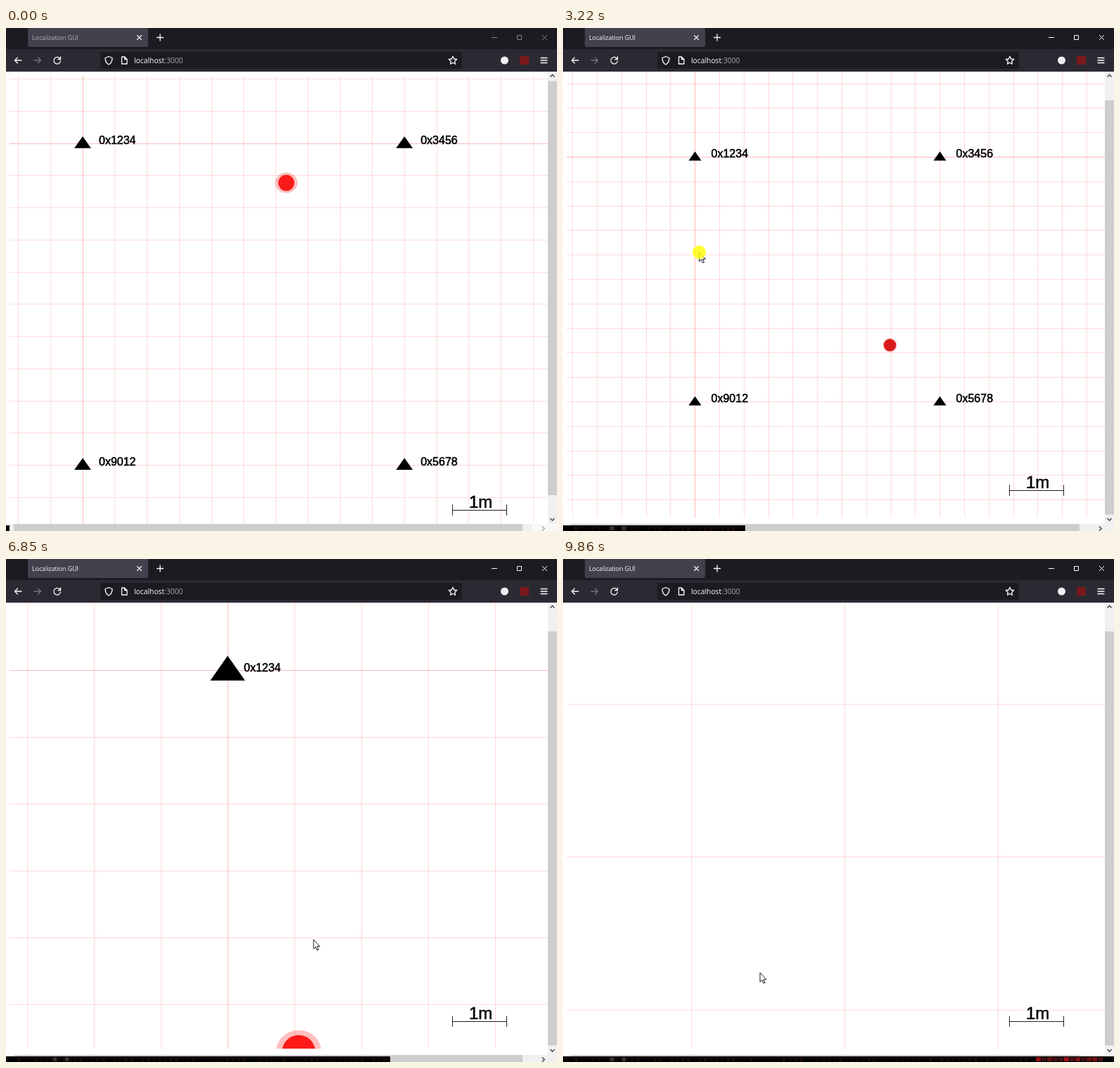
Animation, 783 px wide and 715 px high, one loop 9.93 s. Source, as an HTML page:

```html
<!DOCTYPE html>
<html lang="en">
<head>
<meta charset="utf-8">
<title>Localization GUI</title>
<style>
  html, body { margin: 0; width: 100%; height: 100%; overflow: hidden; background: #fff; }
  svg { display: block; }
  .ui { font-family: "Open Sans", "Noto Sans", sans-serif; }
  .label { font-family: "Liberation Sans", Arial, sans-serif; fill: #000; stroke: #000; stroke-width: .55; }
  .icon { fill: none; stroke: #fbfbfe; stroke-width: 1.3; stroke-linecap: round; stroke-linejoin: round; }
  .dim { stroke: #74737c; }
  #buttons { stroke: #85848c; stroke-width: 1; }
  #title { fill: #b4b3bd; }
  .active #buttons { stroke: #fff; }
  .active #title { fill: #fbfbfe; }
</style>
</head>
<body>
<svg id="stage" width="783" height="715" viewBox="0 0 783 715">
  <defs>
    <clipPath id="view"><rect x="0" y="62" width="770" height="643"/></clipPath>
    <clipPath id="sheet"><rect id="sheetBox" x="5" y="68" width="765" height="656.5"/></clipPath>
    <clipPath id="played"><rect id="playedBox" y="707" height="8"/></clipPath>
  </defs>
  <rect width="783" height="715" fill="#fff"/>

  <g clip-path="url(#view)">
    <g clip-path="url(#sheet)">
      <path id="grid" fill="none" stroke="#f00" stroke-opacity=".14"/>
      <path id="axes" fill="none" stroke="#f00" stroke-opacity=".15"/>
      <g id="anchors"></g>
      <ellipse id="halo" fill="#f00" fill-opacity=".25"/>
      <circle id="tag"/>
      <g id="ruler">
        <path d="M634.5 677.5V693M711.5 677.5V693M634.5 685.5H711.5" fill="none" stroke="#222"/>
        <text class="label" x="658" y="682" font-size="24">1m</text>
      </g>
    </g>
  </g>

  <!-- scrollbars -->
  <rect x="770" y="62" width="13" height="643" fill="#f0f0f0"/>
  <rect id="thumb" x="770" y="75.5" width="13" height="588.5" fill="#cdcdcd"/>
  <path d="M773.5 69.5l3-3 3 3M773.5 697l3 3 3-3" fill="none" stroke="#505050" stroke-width="1.6"/>
  <rect y="705" width="783" height="10" fill="#f0f0f0"/>
  <rect x="11" y="705" width="723" height="10" fill="#cdcdcd"/>
  <path d="M762 708.5l3.200 3-3.200 3" fill="none" stroke="#505050" stroke-width="1.6"/>
  <rect id="corner" x="747" y="705" width="36" height="10" fill="#fff" fill-opacity=".55"/>
  <g id="strip" clip-path="url(#played)"><rect y="707" width="783" height="8"/></g>

  <!-- browser window -->
  <rect width="783" height="30" fill="#1c1b22"/>
  <rect y="30" width="783" height="32" fill="#2b2a33"/>
  <path d="M31 0H202V24q0 3-3 3H34q-3 0-3-3Z" fill="#42414d"/>
  <rect x="134" y="34" width="514" height="24" rx="3" fill="#1c1b22"/>
  <text id="title" class="ui" x="37" y="17" font-size="8.8">Localization GUI</text>
  <text class="ui" x="182" y="50" font-size="10.300" fill="#fbfbfe">localhost<tspan fill="#a8a7b0">:3000</tspan></text>
  <g class="icon">
    <path d="M186.500 10.500l6 6M192.500 10.500l-6 6" stroke-width="1.1"/>
    <path d="M214.500 13.500h9M219 9v9"/>
    <path d="M22 46H12.500M16.500 42l-4 4 4 4"/>
    <path class="dim" d="M40 46h9.500M45.500 42l4 4-4 4"/>
    <path d="M76.300 43a4.800 4.800 0 1 0 1.200 4M77.500 41v3.500H74"/>
    <path d="M146 40.500l5 2c0 4.500-1.500 7.500-5 9.500-3.500-2-5-5-5-9.500Z"/>
    <path d="M164.500 41h4l3.500 3.500V51h-7.500ZM168.500 41v3.500H172"/>
    <path d="M635 40.300l1.700 3.700 4 .5-3 2.800.8 4-3.500-2-3.500 2 .8-4-3-2.800 4-.5Z"/>
    <path d="M760 42.500h9M760 46h9M760 49.500h9"/>
  </g>
  <circle cx="708.500" cy="46" r="5.500" fill="#f0f0f4"/>
  <rect x="730" y="40" width="13" height="12" fill="#7a1a1c"/>
  <path id="buttons" fill="none" d="M690 13.500h8M726.500 10.500h6v6h-6ZM762 10l7 7M769 10l-7 7"/>

  <path id="cursor" d="M0 0V13.200L3 10.400 5 15.200 7 14.300 5 9.700H9Z" fill="#fff" stroke="#000" stroke-width=".9"/>
  <circle id="press" r="9.500" fill="#ff0" fill-opacity=".8"/>
</svg>
<script>
const LOOP = 9930, STEP = 70, LAST = 141;
const $ = id => document.getElementById(id);
const set = (el, attrs) => { for (const k in attrs) el.setAttribute(k, attrs[k]); };
const add = (parent, tag, attrs) => {
  const el = document.createElementNS('http://www.w3.org/2000/svg', tag);
  set(el, attrs);
  return parent.appendChild(el);
};

// name, grid column, grid row
const anchors = [
  ['0x1234', 0, 0], ['0x3456', 10, 0], ['0x5678', 10, 10],
  ['0x9012', 0, 10], ['0x7890', -10, -10]
].map(([name, col, row]) => {
  const tri = add($('anchors'), 'path', {});
  const text = add($('anchors'), 'text', { class: 'label', 'font-size': 16 });
  text.textContent = name;
  return { col, row, tri, text };
});

// time, x, y
const pointer = [
  [0, 790, 722], [900, 493, 450], [2150, 493, 450], [2800, 115, 271],
  [2900, 115, 271], [4130, 583, 555], [4250, 583, 555], [4750, 321, 294],
  [4800, 321, 294], [5390, 421, 491], [6850, 437, 541], [7850, 564, 411],
  [7950, 564, 411], [8880, 155, 215], [9000, 155, 215], [9400, 214, 241],
  [9450, 214, 241], [9860, 280, 588]
];
const drags = [[2900, 4780], [7950, 9430]];
// start, end, wheel ticks, cell size reached, page scroll
const zooms = [
  [1150, 2000, 4, 27.4, 0], [2250, 2500, 2, 34.8, 28.5], [4900, 5250, 3, 24.3, 0],
  [5500, 6800, 11, 95, 28.5], [6900, 7450, 7, 217.6, 28.5]
];
// time, red level, halo radii in cells
const quality = [
  [0, 250, .35, .317], [2100, 226, .27, .27], [5390, 186, .34, .33],
  [6850, 255, .34, .325], [8950, 255, .33, .31], [9930, 250, .35, .317]
];

function track(keys, t) {
  let i = 0;
  while (i < keys.length - 2 && t >= keys[i + 1][0]) i++;
  const a = keys[i], b = keys[i + 1];
  const u = Math.min(1, Math.max(0, (t - a[0]) / (b[0] - a[0])));
  const e = u * u * (3 - 2 * u);
  return a.slice(1).map((v, j) => v + (b[j + 1] - v) * e);
}

function zoomAt(t) {
  let cell = 45.72, scroll = 0;
  for (const [from, to, ticks, target, page] of zooms) {
    if (t < from) break;
    const n = Math.min(ticks, 1 + Math.floor((t - from) / (to - from) * ticks));
    cell *= (target / cell) ** (n / ticks);
    scroll = page;
  }
  return [cell, scroll];
}

function originAt(t) {
  let x = 109, y = 164;
  for (const [from, to] of drags) {
    if (t < from) break;
    const a = track(pointer, from), b = track(pointer, Math.min(t, to));
    x += b[0] - a[0];
    y += b[1] - a[1];
  }
  return [x, y];
}

const crisp = v => Math.floor(v + .25) + .5;

function gridPath(ox, oy, cell) {
  let d = '';
  for (let x = ox - Math.ceil(ox / cell) * cell; x < 770; x += cell) d += `M${crisp(x)} 0V715`;
  for (let y = oy - Math.ceil(oy / cell) * cell; y < 715; y += cell) d += `M5 ${crisp(y)}H770`;
  return d;
}

// dark flecks along the bottom strip, redder near its end
let seed = 7;
const rand = () => (seed = seed * 16807 % 2147483647) / 2147483647;
for (let x = 8; x < 766; x += 8) {
  const red = x > 664, v = rand();
  const fill = red ? `rgb(${50 + 110 * v | 0},18,20)` : `rgb(${28 * v | 0},${12 * v | 0},${14 * v | 0})`;
  add($('strip'), 'rect', { x, y: 708, width: red ? 7 : 5, height: 6, fill });
}
for (const x of [67, 84]) add($('strip'), 'rect', { x, y: 708, width: 5, height: 6, fill: '#333' });

function draw(now) {
  const step = Math.min(LAST, Math.floor((now % LOOP + 15) / STEP)), t = step * STEP;
  const [cell, scroll] = zoomAt(t);
  const [ox, pageY] = originAt(t), oy = pageY - scroll;

  set($('sheetBox'), { y: 68 - scroll });
  set($('ruler'), { transform: `translate(0 ${-Math.round(scroll - .1)})` });
  set($('thumb'), { y: scroll ? 103 : 75.5 });
  set($('grid'), { d: gridPath(ox, oy, cell) });
  set($('axes'), { d: `M${crisp(ox)} 0V715M5 ${crisp(oy)}H770` });

  for (const { col, row, tri, text } of anchors) {
    const x = ox + col * cell, y = oy + row * cell, w = .26 * cell, base = y + .15 * cell;
    set(tri, { d: `M${x} ${y - .22 * cell}L${x + w} ${base}H${x - w}Z` });
    set(text, { x: x + 23, y: y + 1 });
  }

  // the tag circles the middle of the anchor square
  const angle = (-70.6 + .03505 * t) * Math.PI / 180;
  const cx = ox + (5 + 4 * Math.cos(angle)) * cell, cy = oy + (5 + 4 * Math.sin(angle)) * cell;
  const [level, rx, ry] = track(quality, t);
  set($('halo'), { cx, cy, rx: rx * cell, ry: ry * cell });
  set($('tag'), { cx, cy, r: .25 * cell, fill: `rgb(${Math.round(level)},26,26)` });

  const [px, py] = track(pointer, t);
  const held = drags.some(([from, to]) => t >= from && t < to);
  set($('cursor'), { transform: `translate(${px} ${py})` });
  set($('press'), { cx: px, cy: py, visibility: held ? 'visible' : 'hidden' });

  $('stage').classList.toggle('active', t >= drags[0][0]);
  set($('corner'), { visibility: step < 4 ? 'visible' : 'hidden' });
  set($('playedBox'), { width: 5 + 778 * step / LAST });
}

const start = performance.now();
function tick() {
  draw(performance.now() - start);
  requestAnimationFrame(tick);
}
tick();
</script>
</body>
</html>
```
